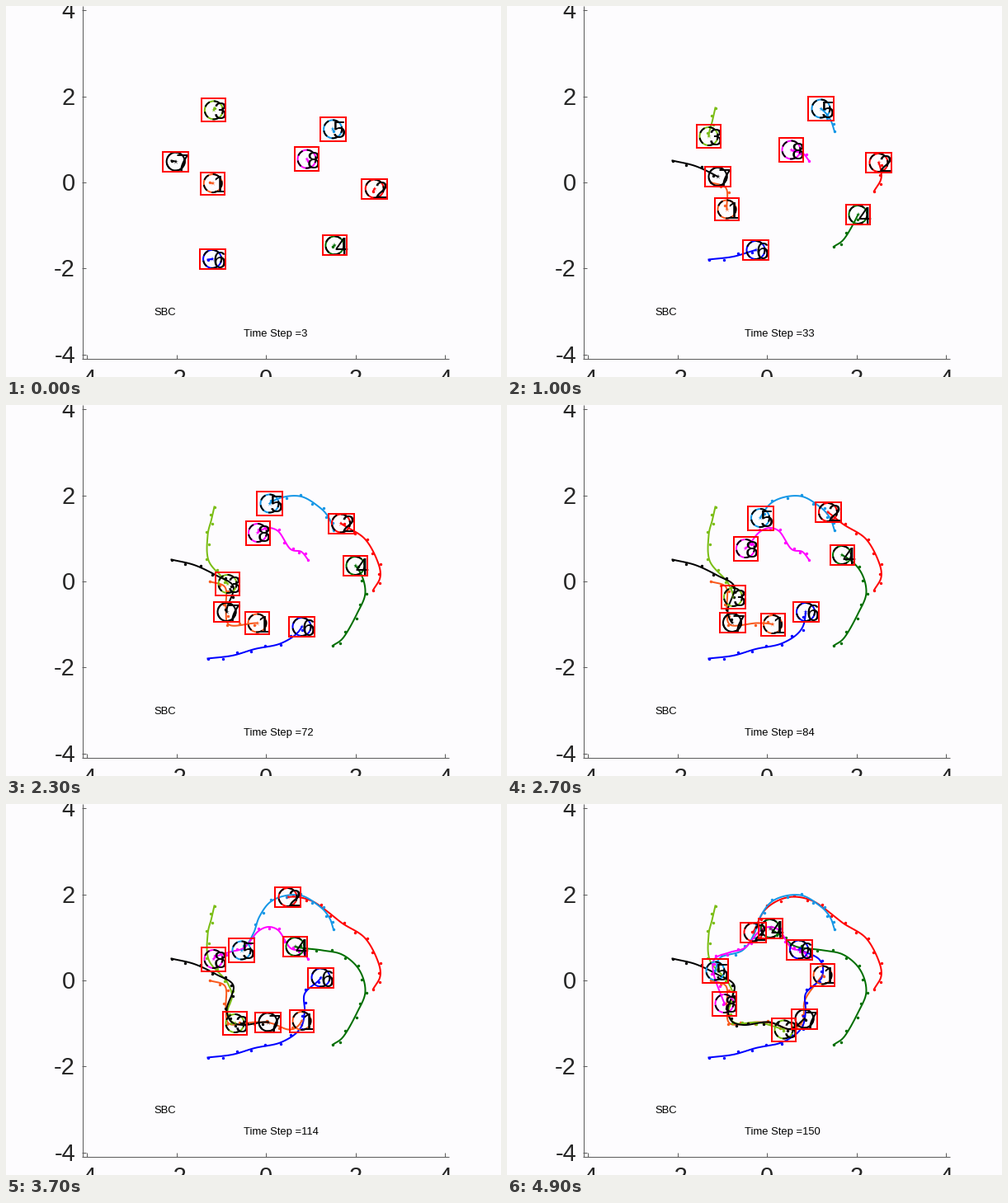
Recreate the animation shown at these times as a matplotlib script. Size 600 px wide and 450 px high, loop 5000 ms.

```python
import numpy as np
import matplotlib.pyplot as plt
from matplotlib.animation import FuncAnimation
from matplotlib.patches import Circle, Rectangle

W, H, DPI = 600, 450, 100
PT = 72 / DPI  # points per pixel
FRAMES, INTERVAL, STEPS_PER_FRAME = 50, 100, 3
FONT = "Liberation Sans"
INK = "#262626"
KEY_STEPS = np.array([0, 16, 33, 51, 72, 84, 96, 114, 132, 150])
RADIUS, DOT_EVERY = 11, 10

fig = plt.figure(figsize=(W / DPI, H / DPI), dpi=DPI, facecolor="#fdfcfe")
ax = fig.add_axes([0, 0, 1, 1])
ax.set_xlim(0, W)
ax.set_ylim(H, 0)
ax.axis("off")


def label(x, y, text, size, color="black", **kw):
    return ax.text(x, y, text, fontsize=size * PT, family=FONT, color=color, **kw)


def line(xs, ys):
    ax.plot(xs, ys, color="#5c5c5c", lw=PT, solid_capstyle="butt")


def draw_axes():
    line([92.5, 92.5], [0, 428])
    line([92, 537], [427.5, 427.5])
    for value in range(-4, 5, 2):
        x, y = 315 + 54.25 * value, 214 - 52.15 * value
        line([92, 97], [y, y])
        line([x, x], [423, 428])
        label(84, y + 10, str(value), 29, INK, ha="right")
        label(x, 461, str(value), 29, INK, ha="center")


def smooth_path(keys, steps):
    """Cubic Hermite curve through the key points."""
    keys = np.asarray(keys, float)
    slopes = np.gradient(keys, KEY_STEPS, axis=0)
    i = np.clip(np.searchsorted(KEY_STEPS, steps, side="right") - 1,
                0, len(KEY_STEPS) - 2)
    h = (KEY_STEPS[i + 1] - KEY_STEPS[i])[:, None]
    u = (steps - KEY_STEPS[i])[:, None] / h
    return ((1 + 2 * u) * (1 - u) ** 2 * keys[i]
            + u * (1 - u) ** 2 * h * slopes[i]
            + u * u * (3 - 2 * u) * keys[i + 1]
            + u * u * (u - 1) * h * slopes[i + 1])


class Robot:
    def __init__(self, name, color, box, keys):
        self.path = smooth_path(keys, np.arange(KEY_STEPS[-1] + 1))
        self.dots = self.side_dots()
        self.box = np.array(box)
        self.trail, = ax.plot([], [], color=color, lw=2 * PT, zorder=3)
        self.marks, = ax.plot([], [], "o", color=color, ms=3.4 * PT, mew=0, zorder=3)
        self.ring = Circle((0, 0), RADIUS, fill=False, ec=color, lw=2 * PT, zorder=4)
        self.dashes = Circle((0, 0), RADIUS, fill=False, ec="black", lw=2 * PT,
                             ls=(0, (4, 3)), zorder=5)
        self.frame = Rectangle((0, 0), *box, fill=False, ec="red", lw=2 * PT, zorder=7)
        for patch in (self.ring, self.dashes, self.frame):
            ax.add_patch(patch)
        self.core, = ax.plot([], [], "*", color=color, alpha=0.55, ms=7 * PT,
                             mew=0, zorder=5)
        self.digit = label(0, 0, name, 29, zorder=6)

    def side_dots(self):
        """Marks left beside the trail, alternating right and left."""
        at = np.arange(0, len(self.path), DOT_EVERY)
        heading = np.gradient(self.path, axis=0)[at]
        heading /= np.linalg.norm(heading, axis=1, keepdims=True)
        right = np.column_stack([-heading[:, 1], heading[:, 0]])
        side = np.where(np.arange(len(at)) % 2, 2.0, -2.0)
        side[0] = 0
        return self.path[at] + right * side[:, None]

    def show(self, step):
        x, y = self.path[step]
        self.trail.set_data(*self.path[:step + 1].T)
        self.marks.set_data(*self.dots[:step // DOT_EVERY + 1].T)
        self.ring.center = self.dashes.center = (x, y)
        self.frame.set_xy((x, y) - self.box / 2)
        self.core.set_data([x], [y])
        self.digit.set_position((x, y + 11))


draw_axes()
label(179, 375, "SBC", 13)
counter = label(287.5, 401.5, "", 13)

robot1 = Robot("1", "#f95a1e", (29, 27), [
    (247, 214), (265.5, 221), (266.5, 246.5), (270.5, 266.5), (304.5, 264.5),
    (322, 266), (342, 273.5), (358.5, 263), (361.5, 237), (382.5, 207.5)])
robot2 = Robot("2", "#ff0000", (31, 24), [
    (445, 224.5), (453.5, 209), (450.5, 190), (435.5, 163), (406, 143.5),
    (389, 130), (371.5, 118), (341.5, 113), (314, 127), (298.5, 155.5)])
robot3 = Robot("3", "#7abd14", (29, 28), [
    (252.5, 123.5), (249, 139), (244.5, 158), (245.5, 188.5), (268.5, 217),
    (274, 233), (268.5, 251), (277.5, 266), (305, 265), (335.5, 273.5)])
robot4 = Robot("4", "#006e00", (29, 24), [
    (396, 292), (409, 282), (425.5, 253), (435.5, 227), (423.5, 195),
    (406, 182), (383.5, 177.5), (350.5, 173), (335.5, 162), (319, 151)])
robot5 = Robot("5", "#1496e6", (31, 29), [
    (397, 152), (392, 138), (380.5, 124.5), (355.5, 110.5), (319.5, 119.5),
    (307, 137), (300.5, 155.5), (285.5, 177.5), (259, 186), (252.5, 202.5)])
robot6 = Robot("6", "#0000ff", (31, 24), [
    (244.5, 307.5), (274, 304), (301.5, 296), (333.5, 289), (358.5, 269),
    (362, 251), (361.5, 231.5), (381.5, 210.5), (379, 189), (354, 176.5)])
robot7 = Robot("7", "#000000", (31, 24), [
    (200.5, 187.5), (228, 194), (255.5, 207), (275.5, 220), (267.5, 251),
    (273, 264), (286.5, 268), (317.5, 264.5), (343, 273), (360.5, 260.5)])
robot8 = Robot("8", "#ff00ff", (29, 29), [
    (366, 187.5), (358, 178), (344.5, 174.5), (328.5, 152), (305, 155),
    (289, 174), (271.5, 179.5), (251.5, 188), (251, 208), (263.5, 242)])
robots = [robot1, robot2, robot3, robot4, robot5, robot6, robot7, robot8]


def update(frame):
    step = STEPS_PER_FRAME * (frame + 1)
    counter.set_text(f"Time Step ={step}")
    for robot in robots:
        robot.show(step)


anim = FuncAnimation(fig, update, frames=FRAMES, interval=INTERVAL,
                     init_func=lambda: update(0), repeat=True, repeat_delay=0)
plt.show()
```
